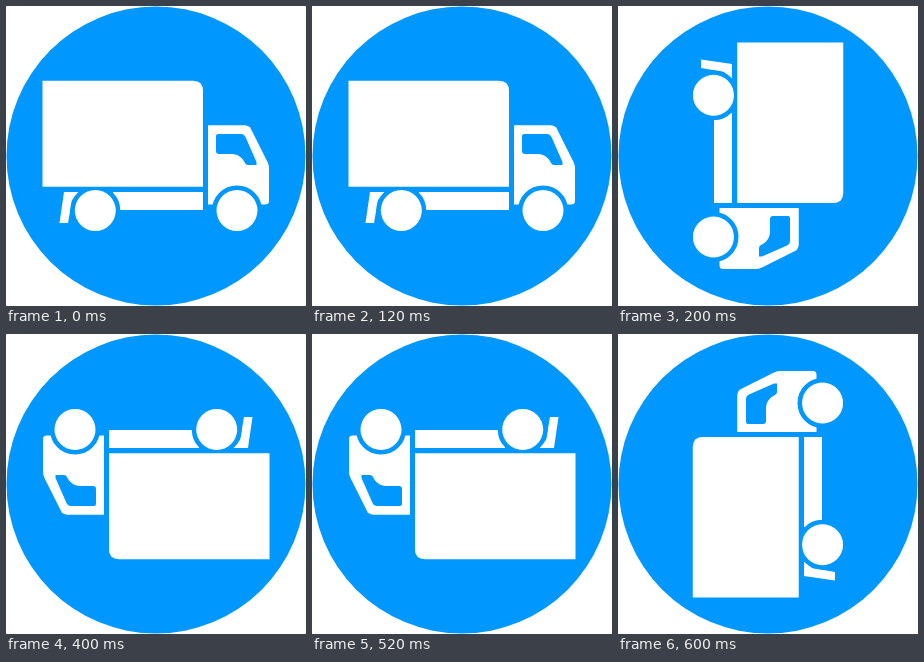
These frames come from a looping animation (300 by 300 pixels, 0.8 s). An HTML page:

```html
<!DOCTYPE html>
<html lang="en">
<head>
<meta charset="utf-8">
<title>Tumbling truck</title>
<style>
  html, body {
    margin: 0;
    width: 100%;
    height: 100%;
    overflow: hidden;
    background: #fff;
  }
  svg { display: block; width: 100%; height: 100%; }
  .blue { fill: #0098ff; }
  .white { fill: #fff; }
  .wheel { fill: #fff; stroke: #0098ff; stroke-width: 9; paint-order: stroke; }
  #truck {
    transform-origin: 150px 150px;
    animation: tumble 800ms steps(4, end) infinite;
  }
  @keyframes tumble {
    from { transform: rotate(0deg); }
    to { transform: rotate(360deg); }
  }
</style>
</head>
<body>
<svg viewBox="0 0 300 300">
  <circle class="blue" cx="150" cy="150" r="149.5"/>
  <g id="truck">
    <g class="white">
      <!-- mudflap, chassis, cab -->
      <path d="M58 186H76L66 194L62 217H53.5Z"/>
      <path d="M107 186H197V204H107Z"/>
      <path d="M202 119.3H238Q243 119.3 245 123L261.5 156Q263 159 263 162V195Q263 198.5 259 198.5H202Z"/>
    </g>
    <path class="blue" d="M212 128H235Q238 128 239.5 131L250.5 156V159H242Q240 159 239 157C237 152 232 148 226 148H213Q210 148 210 145V130Q210 128 212 128Z"/>
    <circle class="wheel" cx="89.3" cy="204.5" r="20.5"/>
    <circle class="wheel" cx="231" cy="204.5" r="20.5"/>
    <path class="white" d="M36.5 74.7H187Q197 74.7 197 85V180.7H36.5Z"/>
  </g>
</svg>
</body>
</html>
```
